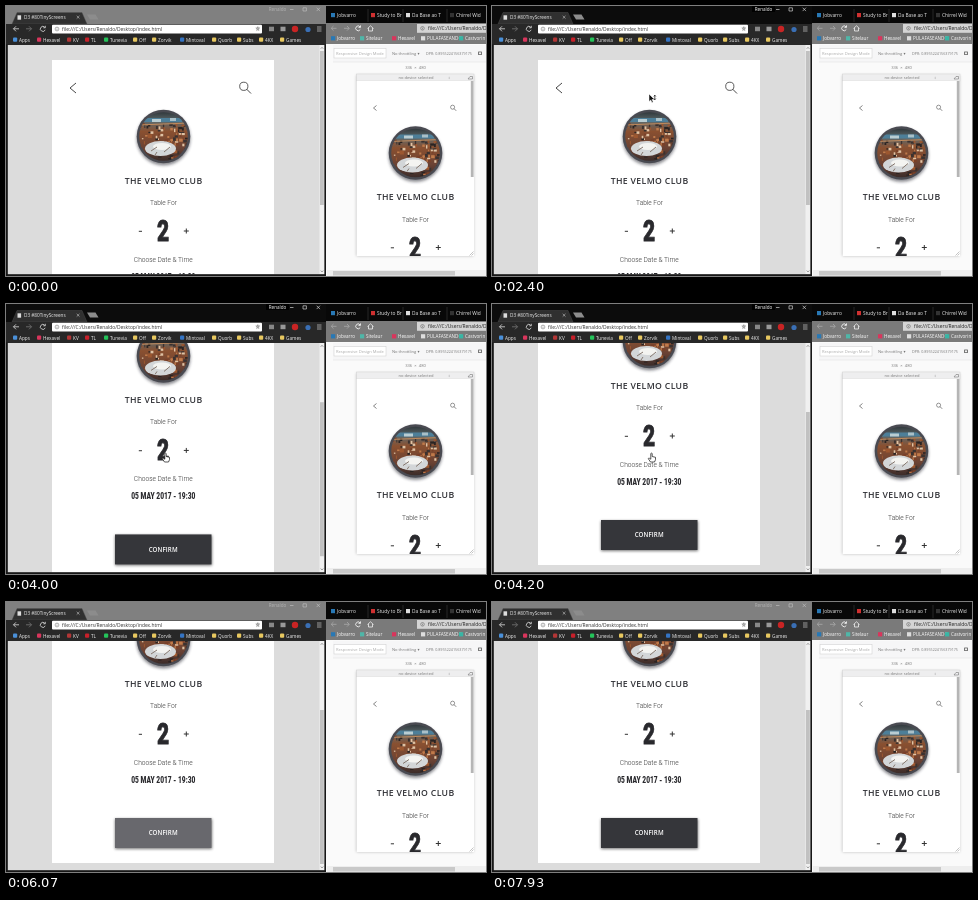
An HTML page for the animation above (8000 ms loop, 480 px wide and 270 px high).

```html
<!DOCTYPE html>
<html lang="en">
<head>
<meta charset="utf-8">
<title>Table booking</title>
<style>
html, body { margin: 0; width: 100%; height: 100%; overflow: hidden; background: #111; }
svg { display: block; width: 100%; height: 100%; }
text { font-family: "Open Sans", "Noto Sans", sans-serif; white-space: pre; }
.thin { font-family: Roboto, sans-serif; font-weight: 300; }
.heavy { font-family: Roboto, sans-serif; font-weight: 900; }
</style>
</head>
<body>
<svg id="stage" viewBox="0 0 480 270"></svg>
<script>
const LOOP = 8000, STEP = 200 / 3, SCROLL = 93;

const rect = (x, y, w, h, fill, extra = '') =>
  `<rect x="${x}" y="${y}" width="${w}" height="${h}" fill="${fill}" ${extra}/>`;
const dot = (x, y, r, fill, extra = '') =>
  `<circle cx="${x}" cy="${y}" r="${r}" fill="${fill}" ${extra}/>`;
const line = (d, color, width = 1, extra = '') =>
  `<path d="${d}" fill="none" stroke="${color}" stroke-width="${width}" ${extra}/>`;
const text = (x, y, s, size, fill, extra = '') =>
  `<text x="${x}" y="${y}" font-size="${size}" fill="${fill}" ${extra}>${s}</text>`;
const mid = (x, y, s, size, fill, extra = '') =>
  text(x, y, s, size, fill, 'text-anchor="middle" ' + extra);
const narrow = (x, y, s, size, fill, extra = '') =>
  `<g transform="translate(${x} ${y}) scale(.7 1)">${mid(0, 0, s, size, fill, 'class="heavy" ' + extra)}</g>`;

const path = 'file:' + '///C:/Users/Renaldo/Desktop/index.html';

let seed = 7;
const rand = () => (seed = seed * 16807 % 2147483647) / 2147483647;

// A busy dining room: flecks over a gradient, with a pale table in front.
function photo() {
  const tones = ['#2a2423', '#c07a4a', '#7a4028', '#dfc2a4', '#3b3230', '#9c5730'];
  let s = dot(157.5, 132.5, 27, '#1a1c28', 'opacity=".5" filter="url(#soft)"') +
    dot(157.5, 130.5, 26.8, '#494a51') +
    '<g clip-path="url(#disc)">' + rect(130, 103, 56, 56, 'url(#room)') +
    rect(138, 112, 38, 4, '#4d7f99') + rect(146, 113, 9, 3, '#b9cdd2') + rect(164, 112, 6, 3, '#a9c0c8');
  for (let i = 0; i < 110; i++) {
    const x = 132 + 50 * rand(), y = 117 + 37 * rand();
    s += rect(x.toFixed(1), y.toFixed(1), (1 + 3 * rand()).toFixed(1), (1 + 2.5 * rand()).toFixed(1), tones[i % 6]);
  }
  return s + line('M132 119L183 117', '#c08a5c', 1) +
    '<ellipse cx="154.5" cy="142.5" rx="15.5" ry="7.5" fill="#d3d6d8"/>' +
    '<ellipse cx="156" cy="140.5" rx="9" ry="3.5" fill="#f4f4f1"/>' +
    line('M145 145l6 -4M158 146l6 -5M149 149l2 -3', '#85776e', 1) + '</g>';
}

const core = () => photo() +
  mid(157.6, 177.8, 'THE VELMO CLUB', 8.7, '#303136', 'font-weight="600" letter-spacing=".35"') +
  mid(157.5, 199, 'Table For', 6.6, '#333', 'class="thin"') +
  line('M132.8 225.3h3.2', '#333', 1) +
  narrow(157, 235, '2', 30, '#29292d', 'stroke="#29292d" stroke-width=".8"') +
  line('M177.8 225h5M180.3 222.5v5', '#333', 1);

const chevron = (x, y, k) =>
  line(`M${x + 3 * k} ${y - 5 * k}L${x - 3 * k} ${y}L${x + 3 * k} ${y + 5 * k}`, '#333', k < 1 ? .6 : .9);
const search = (x, y, k) =>
  line(`M${x + 1.7 * k} ${y + 1.7 * k}L${x + 6 * k} ${y + 6 * k}`, '#333', k < 1 ? .6 : .9) +
  dot(x - 1.2 * k, y - 1.2 * k, 4.1 * k, 'none', `stroke="#333" stroke-width="${k < 1 ? .5 : .8}"`);

const leftPage = () => rect(0, 38, 320, 232, '#dcdcdc') +
  '<g clip-path="url(#view)"><g id="page">' + rect(46, 54, 222, 300, '#fff') +
  chevron(67, 82, 1) + search(239, 81.5, 1) +
  '<g id="core">' + core() + '</g>' +
  mid(157.3, 255.5, 'Choose Date &amp; Time', 6.6, '#333', 'class="thin"') +
  narrow(157.3, 274, '05 MAY 2017 - 19:30', 9.5, '#29292d') +
  rect(109, 310, 97, 30, '#000', 'opacity=".55" filter="url(#soft)"') +
  rect(109, 309, 96.5, 30, '#35363a', 'id="button"') +
  mid(157.2, 326.3, 'CONFIRM', 6.2, '#fff', 'font-weight="600" letter-spacing=".1"') +
  '</g></g>' +
  rect(313.5, 39, 4.8, 229, '#f0f0f0') + rect(314, 45, 3.8, 154, '#c1c1c1', 'id="thumb"') +
  line('M314.7 42.8l1.3 -1.5l1.3 1.5M314.7 264.5l1.3 1.5l1.3 -1.5', '#666', .6);

function leftChrome() {
  const marks = [[13, 'Apps', '#4a90d9'], [37, 'Hexavel', '#d9355c'], [67, 'KV', '#b33636'], [85, 'TL', '#c8202a'],
    [104, 'Tunevia', '#24c45a'], [133, 'Off', '#e8c860'], [152, 'Zorvik', '#e8c860'], [180, 'Mintoval', '#3474c4'],
    [212, 'Quorb', '#e8c860'], [237, 'Subs', '#e8c860'], [259, '4KX', '#e8c860'], [280, 'Games', '#e8c860']];
  let s = rect(0, 0, 320, 18, '#0c0c0c', 'id="strip"') +
    '<path d="M6 18L11 6.5H76L81 18Z" fill="#303030" stroke="#555" stroke-width=".4"/>' +
    rect(11.5, 9.3, 3.6, 4.4, '#ddd') +
    text(18, 13.2, 'D3 #80TinyScreens', 4.7, '#eee') +
    line('M70.7 9.8l2.8 2.8M73.5 9.8l-2.8 2.8', '#ccc', .6) +
    '<path d="M81 8.5h8.5l3 5h-8.5z" fill="#8c8c8c"/>' +
    rect(260, 0, 23, 6, '#000', 'id="badge"') +
    mid(271.5, 4.7, 'Renaldo', 4.6, '#fff', 'id="user"') +
    line('M284 3.5h3.5M297 1.8h3.4v3.2h-3.4zM310.6 1.7l3.4 3.4M314 1.7l-3.4 3.4', '#eee', .6, 'id="winkeys"') +
    rect(0, 18, 320, 21, '#282828') +
    line('M13 22.8H7.5M10 20.3l-2.5 2.5l2.5 2.5', '#ddd', .8) +
    line('M20 22.8h5.5M23 20.3l2.5 2.5l-2.5 2.5', '#777', .8) +
    line('M38.8 21.3a2.5 2.5 0 1 0 .4 2.5M39.3 19.8v2h-2', '#ddd', .8) +
    rect(46, 18.7, 210, 8.8, '#fff', 'rx="1"') +
    dot(51, 23, 1.9, 'none', 'stroke="#666" stroke-width=".5"') + line('M51 22.6v1.4M51 21.6v.5', '#666', .5) +
    text(56, 24.8, path, 4.9, '#333') +
    line('M249.8 21.9h4l-3.2 2.7l1.2 -4l1.2 4z', '#777', .5) +
    rect(263, 20.7, 5, 4.5, '#888') + rect(274.5, 20.7, 5, 4.5, '#999') +
    dot(289, 23, 3.2, '#c92424') + dot(302, 23.5, 2.6, '#3a6fb5') +
    line('M311 21h4.5M311 23h4.5M311 25h4.5', '#ccc', .7);
  for (const [x, name, color] of marks)
    s += rect(x - 6, 31.6, 4.2, 4.2, color, 'rx="1"') + text(x, 35.5, name, 4.7, '#f2f2f2');
  return s + rect(0, 38.5, 1.8, 231.5, '#171717') + rect(318.4, 38.5, 1.6, 231.5, '#171717') +
    rect(0, 268.2, 320, 1.8, '#171717');
}

function rightWindow() {
  const tabs = [[331, 'Jobvarro', '#2878b5'], [371, 'Study to Br', '#cf3030'],
    [406, 'Da Base ao T', '#ddd'], [450, 'Chirrel Wid', '#333']];
  const marks = [[331, 'Jobvarro', '#2878b5'], [360, 'Sitelaur', '#4fb6a8'], [392, 'Hexavel', '#d9355c'],
    [421, 'PULAFASEANDO', '#ddd'], [459, 'Castvorin', '#38b6a5']];
  let s = rect(320, 0, 160, 17.5, '#080808') + rect(320, 17, 160, 21, '#7a7a7a');
  tabs.forEach(([x, name, color], i) => {
    s += rect(x - 6, 7, 4, 4.2, color) + text(x, 11, name, 4.8, '#eee') +
      (i ? line(`M${x - 9} 3v13`, '#444', .5) : '');
  });
  s += line('M330.5 22.3h-5M327.5 20l-2.3 2.3l2.3 2.3', '#aaa', .8) +
    line('M338 22.3h5M341 20l2.3 2.3l-2.3 2.3', '#aaa', .8) +
    line('M354 20.8a2.4 2.4 0 1 0 .3 2.6M354.5 19.4v2h-2', '#fff', .8) +
    line('M361.5 22.5l3 -2.7l3 2.7M362.5 22v3h4v-3', '#fff', .7) +
    rect(411, 18, 69, 8.8, '#d4d4d4') +
    dot(416.5, 22.3, 1.8, 'none', 'stroke="#555" stroke-width=".5"') + line('M416.5 22v1.3M416.5 21v.4', '#555', .5) +
    text(422, 24.2, path, 4.9, '#222');
  for (const [x, name, color] of marks)
    s += rect(x - 6, 30.2, 4.2, 4.2, color) + text(x, 34.2, name, 4.6, '#fff');
  s += rect(320, 38, 160, 232, '#fafafa') + rect(327, 39, 153, 17, '#f6f6f7') +
    rect(328, 42.5, 52, 9.5, '#fff', 'stroke="#ccc" stroke-width=".5"') +
    text(330, 49.2, 'Responsive Design Mode', 4.1, '#aaa') +
    text(386, 49.2, 'No throttling ▾', 4.1, '#777') +
    text(420, 49.2, 'DPR: 0.8955224156379175', 3.7, '#777') +
    rect(472, 45.5, 4, 3.5, '#777', 'rx=".6"') + dot(474, 47.2, 1, '#fff') +
    line('M327 56h153', '#ddd', .5) +
    mid(409.5, 62.8, '336  ×  480', 4.1, '#777') +
    rect(350.5, 69, 117, 181, '#000', 'opacity=".25" filter="url(#soft)"') +
    rect(350.5, 68, 117.5, 7, '#eeeeef', 'stroke="#ccc" stroke-width=".4"') +
    mid(410, 73, 'no device selected', 4.1, '#777') + text(442, 73, '↕', 4, '#777') +
    line('M462 73l2 -2.5h2.5v2.5z', '#777', .6) +
    '<g clip-path="url(#device)">' + rect(350.5, 75, 117.5, 175, '#fff') +
    chevron(369, 102, .5) + search(447.2, 101.8, .5) +
    '<use href="#core" x="252" y="16.5"/>' +
    rect(464.8, 75, 2.8, 96, '#b5b5b5') + '</g>' +
    line('M463.5 249.5l4 -4M465.5 249.5l2 -2', '#888', .5) +
    rect(321, 264, 159, 6, '#eeeeee') + rect(327, 265, 122, 4.5, '#c9c9c9');
  return s + '<g id="inspect">' +
    rect(350.5, 68, 117.5, 7, '#fff', 'opacity=".5"') +
    rect(350.7, 74.5, 117, 175.5, '#8ccbe7', 'opacity=".68" stroke="#3c9fcd" stroke-width=".8" stroke-dasharray="2 1.5"') +
    rect(391, 75.5, 36.5, 8.3, '#33383d', 'rx="1"') +
    mid(409.2, 81.2, 'html  |  320 × 823', 4, '#e8f4fa') + '</g>';
}

const cursor = `<g id="arrow"><path d="M0 0V7.5L1.8 6L3 8.7L4.2 8.1L3 5.5H5.5Z" fill="#111" stroke="#fff" stroke-width=".5"/>
  <path id="wheel" d="M5.8 1.2v4.6M4.8 2.4l1 -1.2l1 1.2M4.8 4.6l1 1.2l1 -1.2" fill="none" stroke="#111" stroke-width=".7"/></g>
  <path id="hand" d="M-.7 0Q0 -.8 .7 0V3L4 3.8V6.2L3 8.5H-1L-3.2 5.2Q-3 4.2 -2 4.8L-.7 5.7Z" fill="#fff" stroke="#111" stroke-width=".7"/>`;

document.getElementById('stage').innerHTML = `<defs>
  <filter id="soft" x="-20%" y="-20%" width="140%" height="140%"><feGaussianBlur stdDeviation="1.5"/></filter>
  <linearGradient id="room" x2="0" y2="1"><stop offset="0" stop-color="#22282c"/><stop offset=".22" stop-color="#5d6a6c"/>
    <stop offset=".4" stop-color="#8a5030"/><stop offset=".7" stop-color="#6a4234"/><stop offset="1" stop-color="#2c2526"/></linearGradient>
  <clipPath id="disc"><circle cx="157.5" cy="130.5" r="24.3"/></clipPath>
  <clipPath id="view"><rect x="1.8" y="39" width="312" height="229.2"/></clipPath>
  <clipPath id="device"><rect x="350.5" y="75" width="117.5" height="175"/></clipPath></defs>` +
  leftPage() + leftChrome() + rightWindow() + `<g id="cursor">${cursor}</g>`;

const el = id => document.getElementById(id);
const set = (id, name, value) => el(id).setAttribute(name, value);
const show = (id, on) => set(id, 'visibility', on ? 'inherit' : 'hidden');
const clamp = v => Math.max(0, Math.min(1, v));
const ramp = (t, a, b) => clamp((t - a) / (b - a));
const smooth = p => p * p * (3 - 2 * p);

// time, x, y
const route = [[60, 306, 246], [730, 272, 209], [1260, 273, 209], [1600, 170, 84], [1800, 80, 34],
  [2070, 120, 62], [2400, 157, 88], [2930, 147, 116], [3400, 159.5, 149.5], [4200, 159.5, 149.5],
  [4700, 163, 212], [5000, 158, 228], [5270, 140, 150], [5530, 104, 42], [5670, 62, 33],
  [5860, 62, 33], [6060, 314, 223]];

function pointer(t) {
  let i = 0;
  while (i < route.length - 2 && t >= route[i + 1][0]) i++;
  const [ta, xa, ya] = route[i], [tb, xb, yb] = route[i + 1];
  const p = smooth(ramp(t, ta, tb));
  return [xa + (xb - xa) * p, ya + (yb - ya) * p];
}

function draw(time) {
  const t = Math.floor((time + 4) / STEP) * STEP;
  const active = t > 590 && t < 5920;
  set('strip', 'fill', active ? '#0c0c0c' : '#808080');
  set('badge', 'fill', active ? '#000' : '#808080');
  set('user', 'fill', active ? '#fff' : '#b4b4b4');
  set('winkeys', 'stroke', active ? '#eee' : '#c4c4c4');

  const down = 1 - (1 - ramp(t, 3800, 4130)) ** 2;
  set('page', 'transform', `translate(0 ${-SCROLL * down})`);
  set('thumb', 'y', 45 + 63 * down);

  const hover = ramp(t, 4730, 4930) - ramp(t, 6530, 6730);
  const mix = (a, b) => Math.round(a + (b - a) * hover);
  set('button', 'fill', `rgb(${mix(53, 104)},${mix(54, 104)},${mix(58, 109)})`);

  const [x, y] = pointer(t);
  const hand = t > 2960 && t < 5150;
  set('cursor', 'transform', `translate(${x} ${y})`);
  show('cursor', t > 60 && t < 6060);
  show('arrow', !hand);
  show('hand', hand);
  show('wheel', t > 2200 && t < 2960);
  show('inspect', t > 7590 && t < 7920);
}

function tick() {
  draw(performance.now() % LOOP);
  requestAnimationFrame(tick);
}
tick();
</script>
</body>
</html>
```
